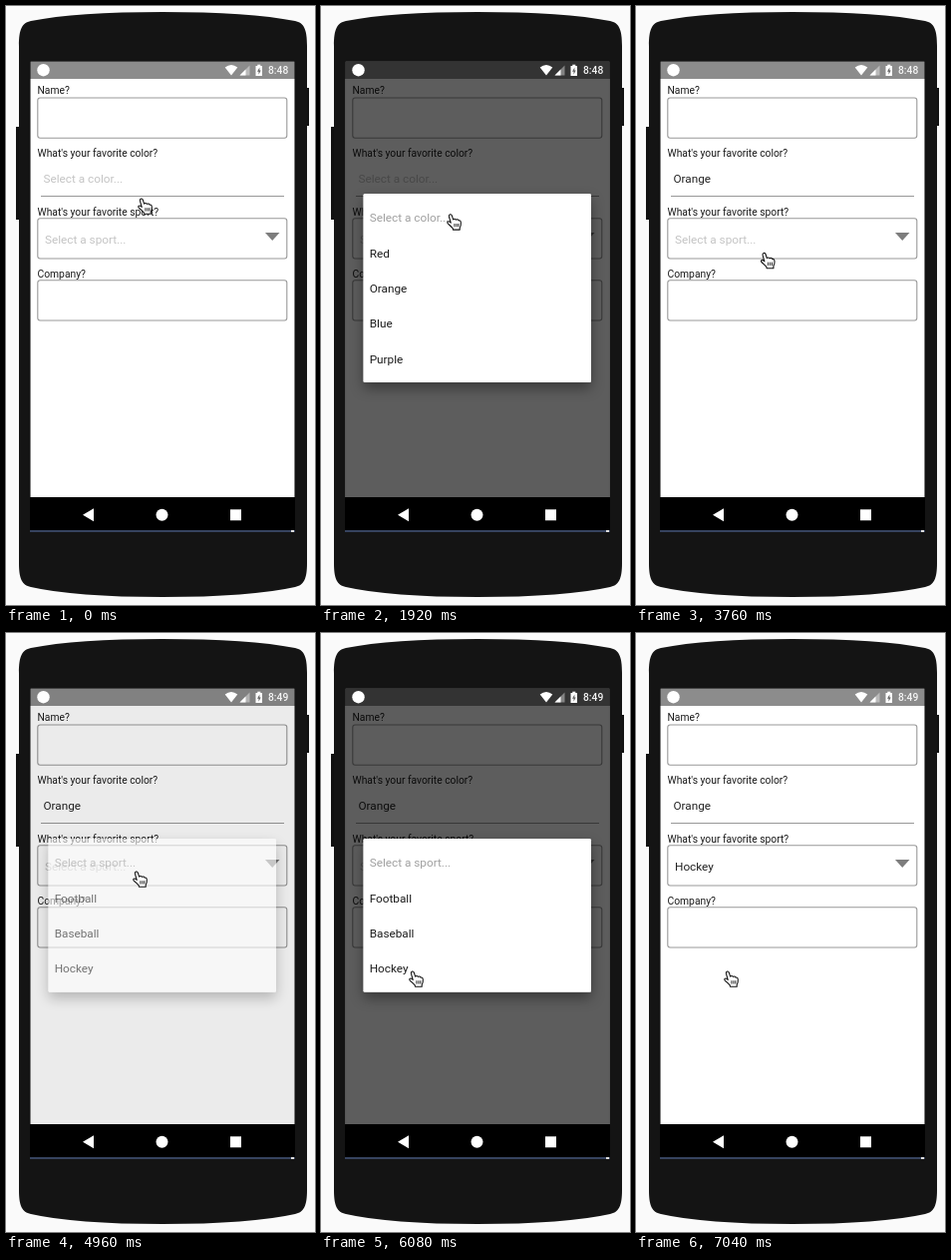
Recreate the animation shown at these times as an HTML page with a canvas. Size 310 px wide and 600 px high, loop 7400 ms.

```html
<!DOCTYPE html>
<html lang="en">
<head>
<meta charset="utf-8">
<title>Picker form</title>
<style>
  html, body { margin: 0; width: 100%; height: 100%; overflow: hidden; background: #fafafa; }
  canvas { display: block; width: 310px; height: 600px; }
</style>
</head>
<body>
<canvas id="stage"></canvas>
<script>
const LOOP = 7400;
const FONT = 'Roboto, sans-serif';
const ROW = 35.35;
const canvas = document.getElementById('stage');
const ctx = canvas.getContext('2d');
const ratio = window.devicePixelRatio || 1;
canvas.width = 310 * ratio;
canvas.height = 600 * ratio;

const body = new Path2D('M13 40C13 23 16 17 25 15Q70 6 157 6T290 15C299 17 302 23 302 40V558C302 574 299 580 290 582Q245 592 157 592T25 582C16 580 13 574 13 558Z');
const hand = new Path2D('M2.4 3.2C1.9 .8 4.7 .1 5.4 2.3L6.6 6.1C7.6 5.1 9 5.4 9.4 6.4C10.4 5.6 11.7 6 12 7.1C13.5 6.6 14.2 7.8 14.3 9.2C14.5 11.6 14 13 13.2 14.2L13.2 16.3H6.4L6.2 14.8C4.7 13.6 2.9 11.5 1.1 9.8C.1 8.5 1.8 7.4 3 8.4L4.2 9.4Z');
const creases = new Path2D('M7.9 10.2V13.5M9.9 10.2V13.5M11.8 10.2V13.5');
const wifi = new Path2D('M219.7 61.6Q226 56.6 232.3 61.6L226 69.5Z');

const dimKeys = [
  [1280, 0], [1280, .2], [1400, .46], [1540, .635], [2590, .635], [2760, .47], [3060, 0],
  [4870, 0], [4960, .075], [5030, .33], [5120, .635], [6350, .635], [6440, .45], [6600, 0]
];
const dialogs = [
  {
    y: 188, items: ['Select a color...', 'Red', 'Orange', 'Blue', 'Purple'],
    fade: [[1280, 0], [1280, .8], [1360, 1], [2590, 1], [2680, .5], [2760, .17], [2840, 0]]
  },
  {
    y: 206, items: ['Select a sport...', 'Football', 'Baseball', 'Hockey'],
    fade: [[4880, 0], [4960, .6], [5040, 1], [6350, 1], [6400, .55], [6480, 0]]
  }
];
const home = [132, 192];
const moves = [
  { from: 20, to: 600, at: [130, 181] },
  { from: 1820, to: 2560, at: [115, 282] },
  { from: 3380, to: 4080, at: [127, 238] },
  { from: 5340, to: 6080, at: [88, 338] }
];

// Linear keyframes; two keys at the same time make a hard step.
function track(keys, t) {
  let [t0, v0] = keys[0];
  for (const [t1, v1] of keys) {
    if (t < t1) return t1 > t0 ? v0 + (v1 - v0) * Math.max(0, t - t0) / (t1 - t0) : v0;
    [t0, v0] = [t1, v1];
  }
  return v0;
}

function pointerAt(t) {
  let [x, y] = home;
  for (const { from, to, at } of moves) {
    const p = Math.min(1, Math.max(0, (t - from) / (to - from)));
    const k = 1 - (1 - p) ** 2.1;
    x += (at[0] - x) * k;
    y += (at[1] - y) * k;
  }
  return [x, y];
}

function rect(x, y, w, h, color) {
  ctx.fillStyle = color;
  ctx.fillRect(x, y, w, h);
}

function shape(path, color) {
  ctx.fillStyle = color;
  ctx.fill(path);
}

function disc(x, y, r, color) {
  ctx.fillStyle = color;
  ctx.beginPath();
  ctx.arc(x, y, r, 0, Math.PI * 2);
  ctx.fill();
}

function text(str, x, y, size, color, weight = 400) {
  ctx.font = `${weight} ${size}px ${FONT}`;
  ctx.fillStyle = color;
  ctx.fillText(str, x, y);
}

function box(y) {
  ctx.strokeStyle = '#999';
  ctx.lineWidth = 1.1;
  ctx.beginPath();
  ctx.roundRect(31.8, y, 250, 40.3, 2.5);
  ctx.stroke();
}

function drawPhone() {
  rect(0, 0, 310, 600, '#fafafa');
  rect(10, 121, 5, 93, '#111');
  rect(300, 82, 4, 38, '#111');
  shape(body, '#141414');
  rect(24, 55, 266, 472, '#000');
  rect(24, 525, 266, 2, '#36435f');
  rect(286, 525, 3, 2, '#ddd');
  shape(new Path2D('M88 503.3V516.3L77 509.8Z'), '#fff');
  disc(156.5, 509.8, 6, '#fff');
  rect(225, 504.3, 11, 11, '#fff');
}

function drawForm(t) {
  rect(24.5, 73, 265, 419, '#fff');
  rect(24.5, 55.5, 265, 17.5, '#8c8c8c');
  const labels = [
    ['Name?', 88.3], ["What's your favorite color?", 150.5],
    ["What's your favorite sport?", 209.5], ['Company?', 271.5]
  ];
  for (const [label, y] of labels) text(label, 31.5, y, 10.3, '#1a1a1a');
  [92, 212.7, 274.7].forEach(box);
  rect(35, 190, 244, 1, '#999');

  const pick = (value, since, hint, x, y) =>
    t < since ? text(hint, x, y, 11.78, '#c4c4c4') : text(value, x, y, 11.78, '#222');
  pick('Orange', 2590, 'Select a color...', 37.5, 176.5);
  pick('Hockey', 6350, 'Select a sport...', 39, 237.6);
  shape(new Path2D('M260 227H274.5L267.2 235Z'), '#7d7d7d');
}

function drawStatus(t) {
  disc(37.5, 64.2, 6.2, '#fff');
  shape(wifi, '#fff');
  shape(new Path2D('M244.5 59.5V69.5H234.5Z'), 'rgba(255,255,255,.4)');
  shape(new Path2D('M240.5 63.5V69.5H234.5Z'), '#fff');
  rect(250.5, 60, 6.5, 10, '#fff');
  rect(252.3, 58.7, 3, 2, '#fff');
  shape(new Path2D('M254.4 61.5L252 65.7H253.5V68.7L255.7 64.5H254.4Z'), '#666');
  text(t < 4400 ? '8:48' : '8:49', 263, 68.2, 10.3, '#f4f4f4', 500);
}

function drawDialog({ y, items, fade }, t) {
  const alpha = track(fade, t);
  if (!alpha) return;
  const card = new Path2D();
  card.roundRect(42.5, y, 228.5, items.length * ROW + 12.3, 1.5);

  // The shadow stays outside the card so the fade does not darken it.
  ctx.save();
  ctx.globalAlpha = alpha;
  const outside = new Path2D(card);
  outside.rect(24.5, 73, 265, 419);
  ctx.save();
  ctx.clip(outside, 'evenodd');
  ctx.shadowColor = 'rgba(0,0,0,.38)';
  ctx.shadowBlur = 13 * ratio;
  ctx.shadowOffsetY = 6 * ratio;
  shape(card, '#fff');
  ctx.restore();
  shape(card, '#fff');
  items.forEach((item, i) =>
    text(item, 48.7, y + 28.3 + i * ROW, 11.78, i ? '#1c1c1c' : '#a0a0a0'));
  ctx.restore();
}

function drawPointer(t) {
  ctx.save();
  ctx.translate(...pointerAt(t));
  shape(hand, '#fff');
  ctx.strokeStyle = '#111';
  ctx.lineJoin = 'round';
  ctx.lineWidth = 1.1;
  ctx.stroke(hand);
  ctx.lineWidth = .9;
  ctx.stroke(creases);
  ctx.restore();
}

function draw(t) {
  ctx.setTransform(ratio, 0, 0, ratio, 0, 0);
  drawPhone();
  drawForm(t);
  rect(24.5, 55.5, 265, 436.5, `rgba(0,0,0,${track(dimKeys, t)})`);
  drawStatus(t);
  dialogs.forEach(dialog => drawDialog(dialog, t));
  drawPointer(t);
}

const start = performance.now();
function frame() {
  draw((performance.now() - start) % LOOP);
  requestAnimationFrame(frame);
}
frame();
</script>
</body>
</html>
```
